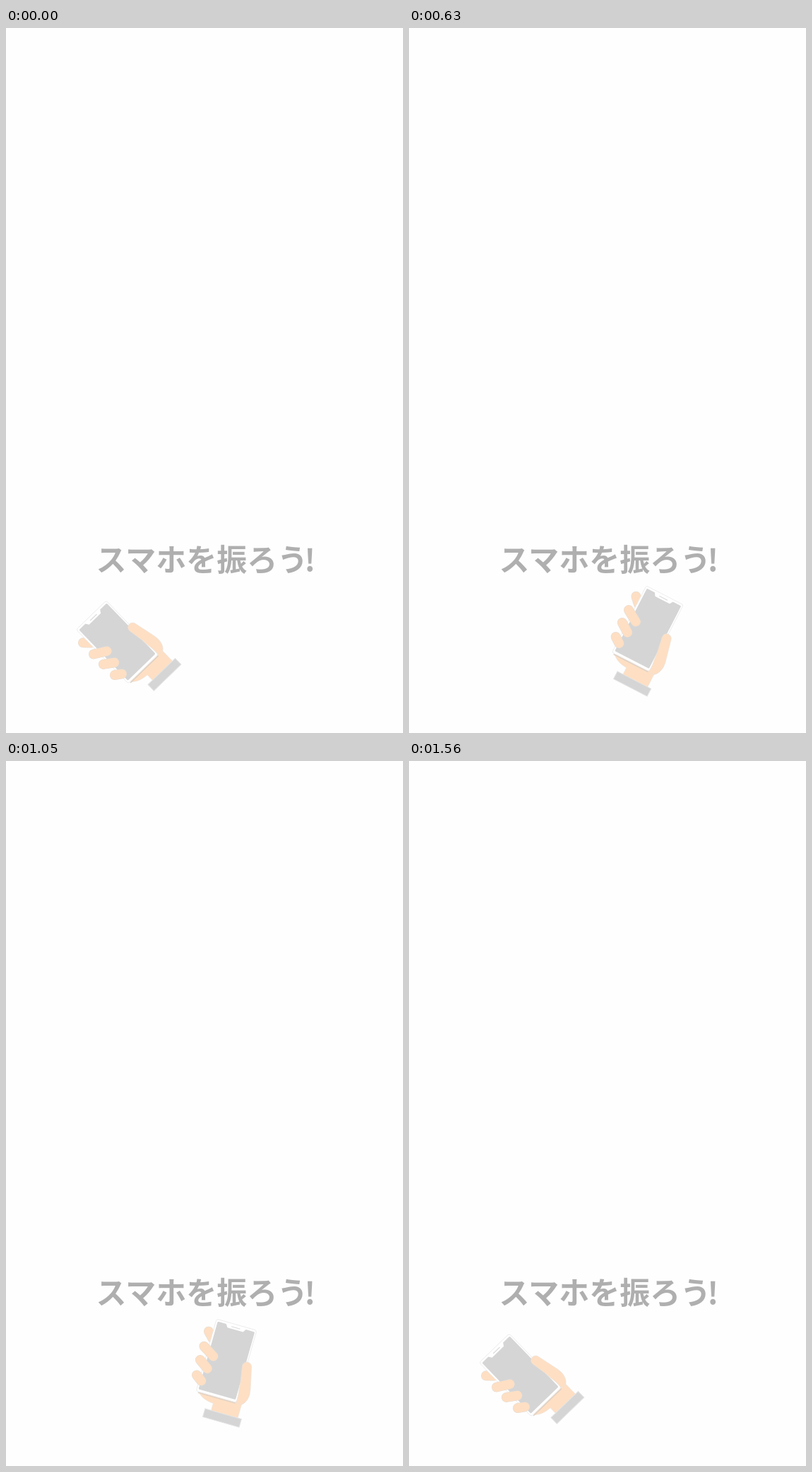
These frames come from a looping animation (562x997 px, 1.77 s). An HTML page:

```html
<!DOCTYPE html>
<html lang="ja">
<head>
<meta charset="utf-8">
<style>
  html, body { margin: 0; width: 100%; height: 100%; overflow: hidden; background: #fefefe; }
  svg { display: block; width: 100%; height: 100%; }
  text { font: bold 43px "Noto Sans CJK JP", "Noto Sans CJK", sans-serif; fill: #afafaf; }
  .skin { fill: #fedfc3; stroke: #ebe3dc; stroke-width: .6; }
  .finger { stroke: #fedfc3; stroke-width: 13; stroke-linecap: round; }
  .edge { stroke: #e2dcd7; stroke-width: 14; stroke-linecap: round; }
  .gray { fill: #d5d5d5; }
</style>
</head>
<body>
<svg viewBox="0 0 562 997">
  <text x="127.5" y="768">スマホを振ろう<tspan dx="-5">!</tspan></text>
  <!-- drawn upright around the pivot (276, 865.5) -->
  <g id="hand">
    <path class="skin" d="M249 900Q255 911 274 912V924H313V903Q320 897 320 886L306 850L290 870V900Z"/>
    <path class="edge" d="M240 816L248 824"/>
    <path class="finger" d="M240 816L248 824"/>
    <path d="M249 903.3H304" stroke="#ddd0c5" stroke-width="1.4"/>
    <rect x="246" y="796" width="59" height="106" rx="3" fill="#fff" stroke="#ececec" stroke-width=".9"/>
    <path class="gray" d="M250 799H261L264 803.5H287L290 799H301.500Q303 799 303 800.500V897Q303 898.500 301.500 898.500H250Q248.500 898.500 248.500 897V800.500Q248.500 799 250 799Z"/>
    <path d="M269 800.5H282" stroke="#dcdcdc" stroke-width="1.2"/>
    <g id="fingers"></g>
    <path class="skin" d="M299.300 851A6.500 6.500 0 0 1 312 847.500L319.500 880Q321 888 318.500 895Q316.500 901 312 903H305.300V893Q303.500 882 303 873Z"/>
    <rect class="gray" x="265" y="922.5" width="53.500" height="12" stroke="#e4e4e4"/>
  </g>
</svg>
<script>
  const STEP = 30, LOOP = 1770, LAST = 52;
  const hand = document.getElementById('hand');

  const fingers = ['M239.500 838L256 848', 'M239.500 858L252.500 867', 'M240.500 880L249 886'];
  document.getElementById('fingers').innerHTML = fingers
    .map(d => `<path class="edge" d="${d}"/><path class="finger" d="${d}"/>`).join('');

  // [step, pivot x, angle], linear in between
  const keys = [[0, 169.3, -44], [13, 276, 0], [27, 372, 47.6], [39, 276, 0], [LAST, 169.3, -44]];

  function pose(step) {
    const i = Math.max(1, keys.findIndex(k => k[0] >= step));
    const a = keys[i - 1], b = keys[i];
    const u = (step - a[0]) / (b[0] - a[0]);
    return [1, 2].map(n => a[n] + (b[n] - a[n]) * u);
  }

  function draw() {
    const step = Math.min(LAST, Math.floor(performance.now() % LOOP / STEP));
    const [x, angle] = pose(step);
    const y = 864.1 + 0.000736 * (x - 316) ** 2;
    hand.setAttribute('transform', `translate(${x} ${y}) rotate(${angle}) translate(-276 -865.5)`);
    requestAnimationFrame(draw);
  }
  draw();
</script>
</body>
</html>
```
